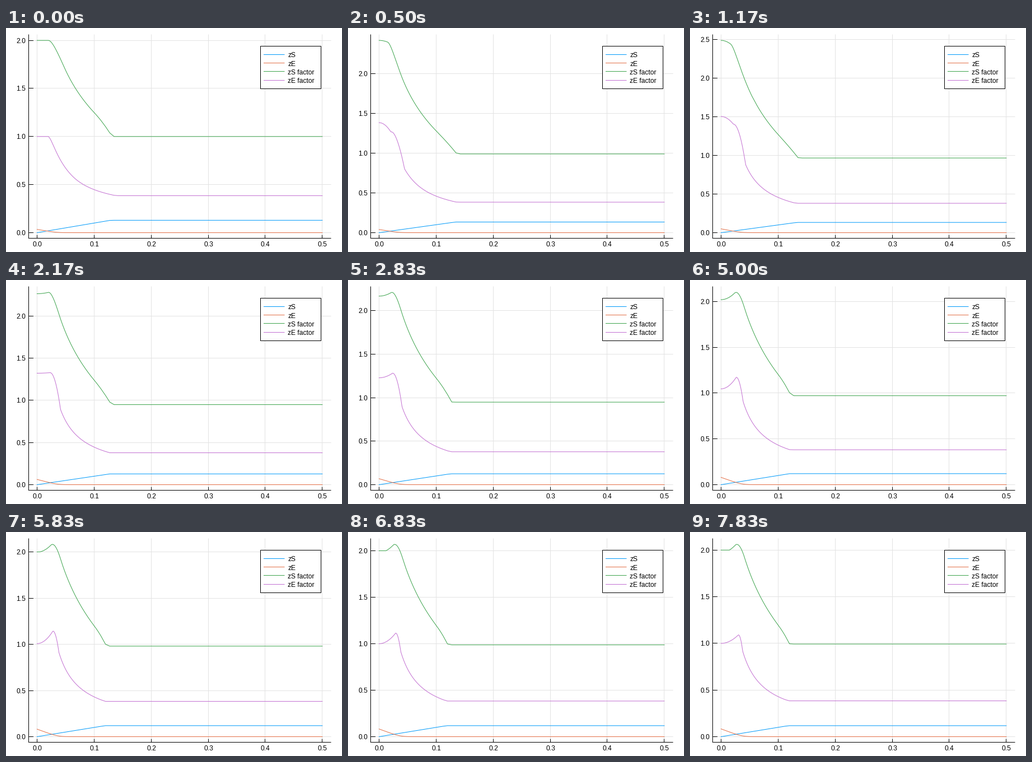
These frames come from a looping animation (600 by 400 pixels, 8 s). A matplotlib script:

```python
import numpy as np
import matplotlib.pyplot as plt
from matplotlib.animation import FuncAnimation

LOOP, STEPS, TICK = 8000, 48, 50
W, H = 600, 400
LEFT, RIGHT, TOP, BOTTOM = 40.5, 580, 12, 375.5
X0, X_SCALE = 55.4, 1018.9
Y0, Y_SPAN = 365.5, 343.4
BLUE, ORANGE, GREEN, PURPLE = "#009AFA", "#E36F47", "#3EA44E", "#C371D2"

plt.rcParams["font.family"] = "Liberation Sans"
plt.rcParams["font.size"] = 8.64

# fine up to 0.1125, coarse around the corners, then one long flat run
X = np.r_[np.linspace(0, .1125, 136), np.arange(.12, .151, .0075), .5]


def mix(a, b, t):
    return a + (b - a) * t


def soft_min(a, b, k):
    return np.minimum(a, b) - np.maximum(k - np.abs(a - b), 0) ** 2 / (4 * k)


def curves(n):
    """The four data series at step n."""
    rise = 1 - np.exp(-(n / 3.3) ** 2)

    def fade(rate):
        return np.exp(-rate * (n - 7))

    def settle(first, last, gain, rate=.09):
        return mix(first, last + gain * fade(rate), rise)

    u = n / 15
    dip = (u * np.exp(1 - u)) ** 2
    x = np.maximum(X, .005)

    # zS climbs with x until it saturates, zE dies out
    top = settle(.129, .1165, .0165, .065)
    zs = np.minimum(X, top)
    start = .084 - .05 * np.exp(-(n / 15) ** 1.3)
    c = .035 + .002 * n / STEPS
    ze = start * np.logaddexp(0, (c - X) / .006) / np.logaddexp(0, c / .006)

    # zS factor: parabolic head, logarithmic fall, bent down to a plateau
    curl = 130 - 300 * min(1, fade(.2))
    head = 2 + np.maximum(0, rise * (.535 * fade(.095) - .04 + curl * X ** 2))
    level = settle(1.25, 1.195, .077)
    slope = .635 + .18 * rise
    end, floor = top + .0025, 1 - .0525 * dip
    gap = level - slope * np.log(end / .1) - floor
    fall = level - slope * np.log(x / .1)
    fall -= gap * (np.maximum(X - .1, 0) / (end - .1)) ** 2
    fs = np.where(X < end, soft_min(head, fall, .28), floor)

    # zE factor: rise to a peak, parabolic drop, hyperbolic fall
    a, level = settle(.0229, .0297, .0026), settle(.448, .429, .028)

    def hyperbola(v):
        return a * (1 / v - 10) + level

    first = 1 + max(0, .61 * fade(.062) - .1)
    peak = 1 + .41 * fade(.0375)
    x_peak = .02 + .0105 * n / (STEPS - 1)
    x_bend = .0375 + .0055 * fade(1 / 15)
    tail = hyperbola(x)
    up = first + (peak - first) * (X / x_peak) ** 2
    drop = ((X - x_peak) / (x_bend - x_peak)) ** 2
    down = peak - (peak - hyperbola(x_bend)) * drop
    hump = np.where(X < x_peak, up, np.where(X < x_bend, down, tail))
    fe = mix(soft_min(1, tail, .41), hump, rise)
    fe = np.maximum(fe, .385 - .007 * dip)

    return zs, ze, fs, fe


fig = plt.figure(figsize=(W / 100, H / 100), dpi=100, facecolor="white")
ax = fig.add_axes([0, 0, 1, 1])
ax.set_xlim(0, W)
ax.set_ylim(H, 0)
ax.axis("off")


def crisp(v):
    return np.floor(v) + .5


def stroke(xs, ys, color="black", z=2):
    return ax.plot(xs, ys, color=color, zorder=z, lw=.72, snap=False)[0]


def label(x, y, text, ha):
    return ax.text(x, y, text, ha=ha, va="baseline", zorder=6)


GRID_STYLE = dict(color="#e3e3e3", z=1)
levels = []
for k in range(6):
    px = crisp(X0 + k * .1 * X_SCALE)
    stroke([px, px], [TOP, BOTTOM], **GRID_STYLE)
    stroke([px, px], [BOTTOM, BOTTOM - 5.4])
    label(px + .4, 390.2, f"{k / 10:.1f}", "center")
    levels.append((k / 2,
                   stroke([LEFT, RIGHT], [0, 0], **GRID_STYLE),
                   stroke([LEFT, LEFT + 8], [0, 0]),
                   label(35, 0, f"{k / 2:.1f}", "right")))
stroke([LEFT, LEFT], [TOP, BOTTOM])
stroke([LEFT, RIGHT], [BOTTOM, BOTTOM])

SERIES = [("zS", BLUE), ("zE", ORANGE), ("zS factor", GREEN), ("zE factor", PURPLE)]
lines = [stroke([], [], color, 3) for _, color in SERIES]

ax.add_patch(plt.Rectangle((454.5, 32.5), 108, 76, fc="white", ec="black",
                           lw=.72, snap=False, zorder=4))
for k, (name, color) in enumerate(SERIES):
    y = 47.5 + 15.2 * k
    stroke([460.5, 497], [crisp(y)] * 2, color, 5)
    label(503, y + 4.8, name, "left")


def draw(i):
    n = int((i * TICK + 40) * STEPS / LOOP)
    data = curves(n)
    peak = data[2].max()
    scale = Y_SPAN / peak
    for line, values in zip(lines, data):
        line.set_data(X0 + X * X_SCALE, Y0 - values * scale)
    for value, grid, tick, text in levels:
        y = Y0 - value * scale
        grid.set_ydata([crisp(y)] * 2)
        tick.set_ydata([crisp(y)] * 2)
        text.set_y(y + 4.5)
        for part in (grid, tick, text):
            part.set_visible(value <= 1.03 * peak)
    return lines


anim = FuncAnimation(fig, draw, frames=LOOP // TICK, interval=TICK,
                     init_func=lambda: draw(0), repeat=True, repeat_delay=0,
                     blit=False, cache_frame_data=False)
plt.show()
```
